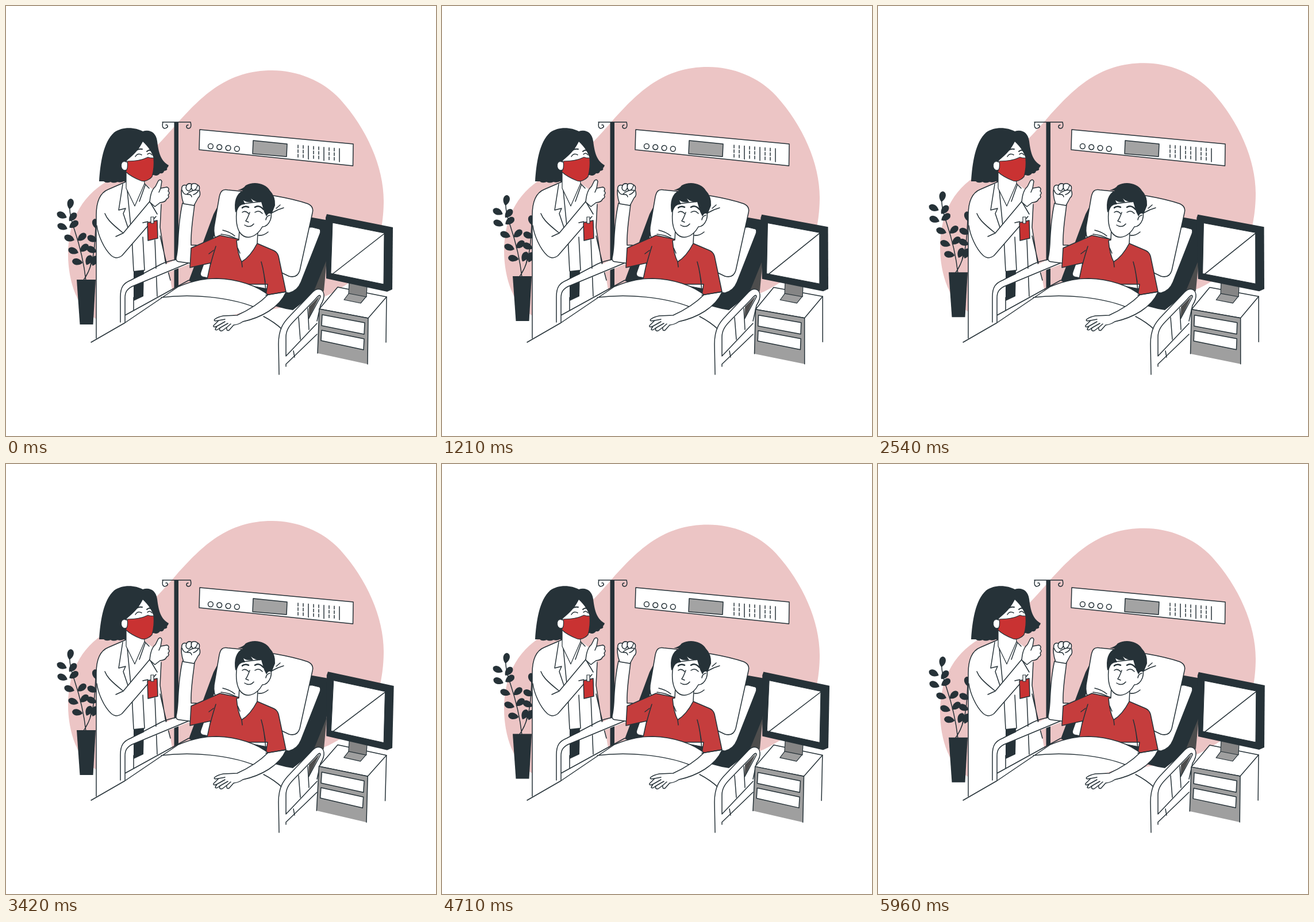
Animation, 748 px wide and 748 px high, one loop 6000 ms. Source, as an HTML page with a canvas:

```html
<!DOCTYPE html>
<html lang="en">
<head>
<meta charset="utf-8">
<title>Hospital visit</title>
<style>
html, body { margin: 0; width: 100%; height: 100%; overflow: hidden; background: #fff; }
canvas { display: block; width: 748px; height: 748px; }
</style>
</head>
<body>
<canvas id="stage" width="748" height="748"></canvas>
<script>
const ctx = document.getElementById('stage').getContext('2d');
const INK = '#263238', WHITE = '#fff', PINK = '#ecc5c5', RED = '#c53d3d', MASK = '#c93232';
const GREY = '#9f9f9f', SLATE = '#4d4d4d';

// One part: path, fill (or null), outline width (0 for none)
const part = (d, fill = null, width = 1.5) => ({ path: new Path2D(d), fill, width });
const lines = d => part(d);
const solid = (d, fill = INK) => part(d, fill, 0);

function paint(parts) {
  for (const p of parts) {
    if (p.fill) { ctx.fillStyle = p.fill; ctx.fill(p.path); }
    if (p.width) { ctx.lineWidth = p.width; ctx.stroke(p.path); }
  }
}

const blob = [solid('M463 112C505 112 551 129 581 162C628 214 657 280 657 339C657 375 650 402 645 420C630 460 600 483 560 503C480 535 250 560 160 546C125 530 108 480 108 432C108 370 135 325 185 300C235 275 262 245 297 205C342 155 385 112 463 112Z', PINK)];

const plant = [
  lines('M139 478C135 440 126 410 119 389C113 372 110 356 111 345M134 478C146 462 155 440 156 380M139 470Q149 454 148 440'),
  solid('M123 476H156L151.5 554H128.5Z')
];
const leaf = new Path2D('M-9 0C-8 -7 3 -8 9.5 0C3 8 -8 7 -9 0Z');
// Leaf: centre x, centre y, tilt in degrees
const leaves = [
  [112, 344, 100], [97, 364, 25], [116, 367, 130], [98, 384, 22], [118, 380, 145],
  [110, 404, 20], [132, 402, 140], [117, 426, 20], [136, 421, 140],
  [124, 445, 10], [144, 442, 115], [156, 379, 75], [150, 405, 25], [149, 424, 25], [154, 443, 110]
];

const pole = [
  solid('M292.5 202H300V490H292.5Z'),
  lines('M272 202H321M273 202C270 213 276 214 279 212C283 210 281 206 278 207M321 202C323 210 321 213 317 213C313 212 313 207 317 207')
];

const panel = [
  part('M337 215L604 240L603.5 278L336 250Z', WHITE),
  part('M430 234L489 240L488 262L429 257Z', '#a3a3a3'),
  lines([0, 1, 2, 3].map(i => `M${351.5 + i * 15.3} ${244 + i * 1.5}a4.4 4.4 0 1 0 8.8 0a4.4 4.4 0 1 0 -8.8 0`).join(''))
];

function panelMarks() {
  for (let i = 0; i < 9; i++) {
    const x = 508 + i * 9, y = 242 + i * 0.75, full = i % 3 === 2;
    ctx.setLineDash(full ? [] : [5, 3]);
    ctx.beginPath();
    ctx.moveTo(x, y);
    ctx.lineTo(x, y + (full ? 23 : 21));
    ctx.stroke();
  }
  ctx.setLineDash([]);
}

const doctor = [
  solid('M208 306L178 319C163 325 157 341 157 364V578L207 553L290 500L285 470L276 443L268 385L270 345L256 319L240 308Z', WHITE),
  lines('M208 306L178 319C163 325 157 341 157 364V578M270 345L268 385L277 443L286 477M211 321L219 403L222 461M238 402L241 460M259 407L263 505M268 400L279 447'),
  solid('M222 461L240 459L239 505L222 513Z'),
  lines('M203 310L196 355L208 352L204 361L214 391M240 308L249 317M232 340L242 312'),
  solid('M162 305C164 274 169 237 188 220C203 209 225 211 238 218C250 214 261 220 263 235C266 260 271 270 283 277Q282 281 280 282Q282 286 275 287Q274 292 268 291Q263 297 257 294L215 302Q211 308 205 305Q200 308 194 306Q187 309 182 306Q174 309 170 305Z'),
  part('M209 286V317L224 348L241 309L240 299Z', WHITE, 1.2),
  solid('M238 236C229 254 219 261 210 269L212 294L253 298L257 265C254 255 248 245 238 236Z', WHITE),
  part('M212 273C204 267 199 273 201 281C203 286 207 287 211 284Z', WHITE, 1),
  part('M211 270C226 270 239 267 247 263Q252 265 257 264C258 276 257 287 254 297C249 303 241 306 235 304C225 300 213 293 208 288C212 284 212 277 211 270Z', MASK, 1.2),
  lines('M225 262Q229 255 236 259M246 258Q250 254 254 259'),
  part('M222 256Q228 247 237 249M245 253Q249 249 253 252', null, 2),
  solid('M158 382C160 398 170 422 183 434C190 440 197 438 202 434L261 366L258 350L250 340L204 395C197 391 191 383 186 375Z', WHITE),
  lines('M158 382C160 398 170 422 183 434C190 440 197 438 202 434L261 366M172 361C175 369 180 376 204 395L250 340L263 362M204 395L191 401'),
  part('M250 341C251 328 254 319 260 314L265 304Q269 300 271 305L269 317L280 315Q285 317 282 322Q286 325 282 329Q285 333 279 336Q278 341 268 342L259 349Z', WHITE),
  lines('M269 317L266 324M238 377L247 375'),
  part('M246 377L263 373L264 404L247 408Z', MASK),
  part('M252 367H257V378H252Z', WHITE, 1.2)
];

const bed = [
  solid('M361 362L318 478L345 490L487 527L499 529L536 500L557 445L567 374L533 368L378 330Z'),
  solid('M558 441L553 495L526 543L534 500Z', SLATE),
  part('M533 385L545 388Q548 390 546 396L513 480Q507 495 492 499L342 471Q337 469 339 463L365 390Z', WHITE, 1),
  part('M386 320C376 318 373 323 371 332L362 384Q360 400 368 410L492 470Q507 474 511 460L533 360Q536 349 525 344C490 332 430 324 386 320Z', WHITE),
  lines('M462 360Q472 354 483 351M470 352L477 346M374 397Q388 398 401 405M377 390Q390 393 398 400M439 399Q448 400 456 393')
];

const torso = [
  part('M307 343C302 365 300 390 299 415Q298 430 296 438Q295 445 302 445L325 448L331 416L322 416C321 390 326 365 328 345Z', WHITE),
  part('M309 344C306 336 304 325 306 315Q308 310 314 312Q317 307 323 310Q328 307 333 311Q338 313 336 320Q340 329 334 334L327 347Z', WHITE),
  lines('M306 320Q310 330 316 327M314 312Q311 320 318 322Q324 318 322 312M323 310Q321 319 326 321Q332 319 333 312M315 327Q325 318 335 321M316 328Q322 327 323 332M335 321Q331 327 326 328'),
  part('M372 399L322 421L320 455L356 447L348 484H455L452 503L487 497L474 435Q472 428 465 425L437 413L406 406Z', RED),
  lines('M365 418Q359 437 356 449M361 425L353 431M444 445Q450 465 452 498M448 462L451 480'),
  part('M406 388L405 407L401 408Q403 432 410 445Q425 436 437 413L438 394Z', WHITE),
  lines('M410 445L411 454M403 421L407 430'),
  part('M403 345C399 366 400 382 406 393C416 408 435 404 446 384Q455 384 460 372Q464 359 457 356L446 340Z', WHITE),
  solid('M399 359C396 340 400 327 412 321L403 320Q413 318 417 312C432 304 452 309 459 321Q469 331 468 347L462 362Q457 358 453 366L449 358L444 341Q434 342 426 335L430 341Q420 343 413 338L416 345Q406 344 402 356Z'),
  lines('M411 359Q416 355 422 361M433 359Q440 354 446 361M424 359Q420 370 417 374L422 376M415 381Q424 387 431 379M452 372Q453 365 459 364'),
  part('M411 351Q415 347 422 350M433 350Q440 345 448 354', null, 2.5)
];

const blanket = [
  solid('M148 585L207 551L300 488C330 476 348 474 366 474C402 475 438 486 459 505L425 529L390 539L360 552L368 566L398 557L443 541L490 570L500 600L480 650L160 650Z', WHITE),
  lines('M148 585L207 551L300 488C330 476 348 474 366 474C402 475 438 486 459 505M270 507C325 500 389 507 430 523M448 540C471 552 490 568 499 589')
];

const arm = [
  solid('M455 503C442 516 422 529 402 538L378 539Q368 541 363 545Q360 549 370 547L361 556Q360 560 367 557L364 562Q365 566 372 560Q370 566 376 565L384 559Q383 566 388 564L396 555Q405 554 412 549C444 542 475 525 487 498Z', WHITE),
  lines('M455 503C442 516 422 529 402 538L378 539Q368 541 363 545Q360 549 370 547L361 556Q360 560 367 557L364 562Q365 566 372 560Q370 566 376 565L384 559Q383 566 388 564L396 555Q405 554 412 549C444 542 475 525 487 498M370 547L381 545M367 557L381 549M372 560L386 552M384 559L391 553'),
  part('M452 503L487 497')
];

const leftRail = [
  solid('M199 549V506C199 488 205 482 217 477L296 441L321 448L219 488C210 493 207 498 207 508V545Z', WHITE),
  lines('M199 550V506C199 488 205 482 217 477L270 449Q283 443 297 441M207 550V508C207 498 210 493 219 488L320 446M207 538L318 477M222 507V529')
];

const rightRail = [
  solid('M475 641L474 588C474 562 483 550 494 539L533 498C542 489 552 492 553 502Q553 511 546 522L541 549L487 609V576C487 563 494 555 502 547L539 510Q546 502 546 509L528 542V563L541 555V571L487 626L480 641Z', WHITE),
  solid('M546 504L527 523L526 545Z', SLATE),
  lines('M475 641L474 588C474 562 483 550 494 539L533 498C542 489 552 492 553 502Q554 510 547 521L541 548M487 609V576C487 563 494 555 502 547L538 510Q547 499 547 506L526 545M487 609L541 552M487 627V623L541 571M509 542L512 580M525 526L527 563M500 600L502 611')
];

const cabinet = [
  solid('M662 506L661 585L629 623L630 543Z', WHITE),
  part('M577 489L662 506L630 543L545 527Z', WHITE),
  lines('M662 506L661 585'),
  solid('M545 527L630 543L629 623L542 604Z', GREY),
  lines('M542 604L545 527L630 543L629 623'),
  part('M550 537L624 551L623 571L549 556Z', WHITE),
  part('M549 564L623 579L622 598L548 582Z', WHITE),
  part('M597 499L627 505L617 517L588 511Z', GREY, 1.2),
  part('M597 480L628 487L627 506L596 500Z', '#858585', 1.2),
  solid('M558 362L673 385L672 493L663 497L557 474L556 368Z'),
  part('M568 377L658 395L657 484L565 465Z', WHITE, 1),
  lines('M658 396L567 467')
];

function drawPlant() {
  paint(plant);
  ctx.fillStyle = INK;
  for (const [x, y, tilt] of leaves) {
    ctx.save();
    ctx.translate(x, y);
    ctx.rotate(tilt * Math.PI / 180);
    ctx.fill(leaf);
    ctx.restore();
  }
}

// Linear float: up 15px and back every 6 s
const lift = t => -15 * (1 - Math.abs(1 - (t % 6000) / 3000));

// Linear sway in degrees every 1.5 s: 0, 1, -1, 0
function sway(t) {
  const u = (t % 1500) / 1500;
  if (u < 0.25) return u * 4;
  if (u < 0.75) return 2 - u * 4;
  return u * 4 - 4;
}

function draw(t) {
  ctx.fillStyle = WHITE;
  ctx.fillRect(0, 0, 748, 748);
  ctx.strokeStyle = INK;
  ctx.lineCap = ctx.lineJoin = 'round';

  ctx.save();
  ctx.translate(0, lift(t));
  paint(blob);
  drawPlant();
  ctx.restore();

  paint(panel);
  panelMarks();
  [pole, doctor, bed, leftRail, torso, blanket, arm, rightRail].forEach(paint);

  ctx.save();
  ctx.translate(608, 492.5);
  ctx.rotate(sway(t) * Math.PI / 180);
  ctx.translate(-608, -492.5);
  paint(cabinet);
  ctx.restore();
}

const start = performance.now();
function tick() {
  draw((performance.now() - start) % 6000);
  requestAnimationFrame(tick);
}
tick();
</script>
</body>
</html>
```
